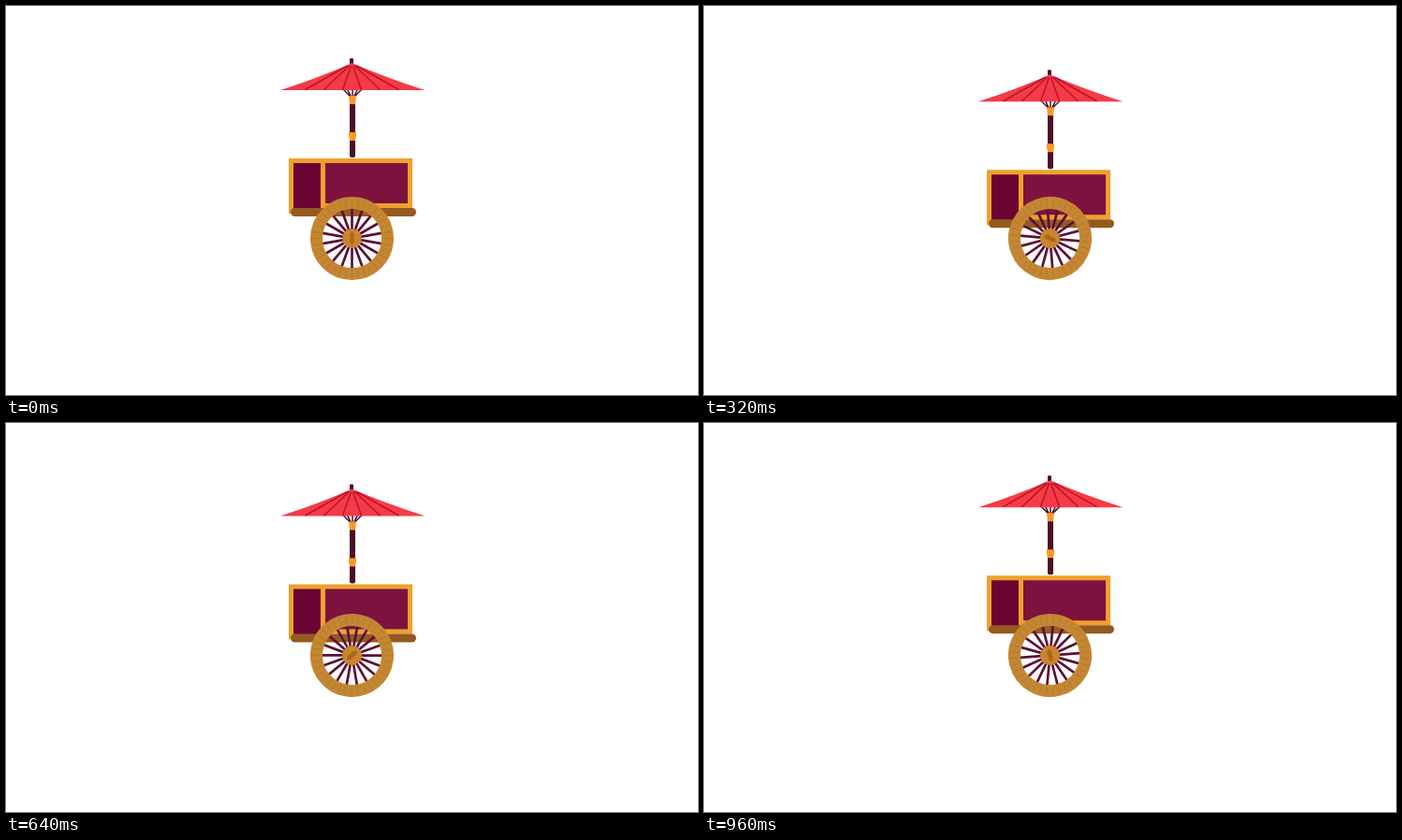
An HTML page for the animation above (1000 ms loop, 739 px wide and 416 px high).

```html
<!DOCTYPE html>
<html lang="en">
<head>
<meta charset="utf-8">
<title>Cart</title>
<style>
  html, body { margin: 0; width: 100%; height: 100%; overflow: hidden; background: #fff; }
  svg { display: block; width: 739px; height: 416px; }
</style>
</head>
<body>
<svg viewBox="0 0 739 416">
  <g id="cart">
    <!-- parasol -->
    <path d="M367 62V57q0-1 1-1h2q1 0 1 1v5z" fill="#4a1026"/>
    <g stroke="#4a1026" stroke-width="1.5" fill="none">
      <path d="M360 89l8 8M364.500 89l4 8M370 89v8M375.500 89l-4 8M380 89l-8 8"/>
    </g>
    <path d="M369.500 61Q336 76 293 90H447.500Q404 76 369.500 61z" fill="#f73a47"/>
    <g id="ribs" stroke="#b8152b" stroke-width="1.500"></g>
    <!-- pole -->
    <path d="M367 98h6v62q0 2-3 2t-3-2z" fill="#4a1026"/>
    <path d="M366 96h8l-1 9h-6zM366 135h8v4l-1 5h-6l-1-5z" fill="#f9982a"/>
    <!-- box -->
    <path d="M302 163H434V216H341V222H302z" fill="#eda12d"/>
    <path d="M307 168h29v54h-29z" fill="#6b0433"/>
    <path d="M341 168h88v43h-88z" fill="#7d123f"/>
    <path d="M336 216h6v6h-6z" fill="#eda12d"/>
    <rect x="304" y="216" width="134" height="9" rx="4.500" fill="#945a20"/>
  </g>
  <g transform="translate(369.500 248.500)">
    <g id="wheel">
      <g id="spokes" stroke="#5c1034" stroke-width="2.700"></g>
      <circle r="38" fill="none" stroke="#c48632" stroke-width="13"/>
      <g id="ticks" stroke="#a9722b" stroke-width="0.900" opacity="0.700"></g>
      <circle r="10.500" fill="#c8852c"/>
      <path d="M0-7Q4-4 2 0Q4 4 0 7Q-4 4-2 0Q-4-4 0-7z" fill="#a9691f"/>
    </g>
  </g>
</svg>
<script>
const LOOP = 1000, STEP = 40, PEAK = 440, DROP = 15;
const el = id => document.getElementById(id);

function addLine(parent, x1, y1, x2, y2, angle = 0) {
  const line = document.createElementNS("http://www.w3.org/2000/svg", "line");
  Object.entries({ x1, y1, x2, y2, transform: `rotate(${angle})` })
    .forEach(([name, value]) => line.setAttribute(name, value));
  el(parent).append(line);
}

for (let i = -3; i < 3; i++) {
  const x = (i + 0.5) * 20;
  addLine("ribs", 369.5 + x * 0.1, 64, 369.5 + x, 89.5);
}
for (let i = 0; i < 18; i++) addLine("spokes", 0, -9, 0, -32, i * 20);
for (let i = 0; i < 36; i++) addLine("ticks", 0, -34, 0, -42, i * 10);

const smooth = u => u * u * (3 - 2 * u);

function drop(t) {
  if (t < PEAK) return DROP * smooth(t / PEAK);
  const u = (t - PEAK) / (LOOP - PEAK);
  return DROP * (1 - smooth(u + 0.06 * Math.sin(Math.PI * u)));
}

function draw(now) {
  const t = Math.floor((now % LOOP) / STEP) * STEP;
  el("cart").setAttribute("transform", `translate(0 ${drop(t).toFixed(2)})`);
  el("wheel").setAttribute("transform", `rotate(${t / LOOP * 360})`);
}

let start;
function tick(now) {
  start ??= now;
  draw(now - start);
  requestAnimationFrame(tick);
}
draw(0);
requestAnimationFrame(tick);
</script>
</body>
</html>
```
